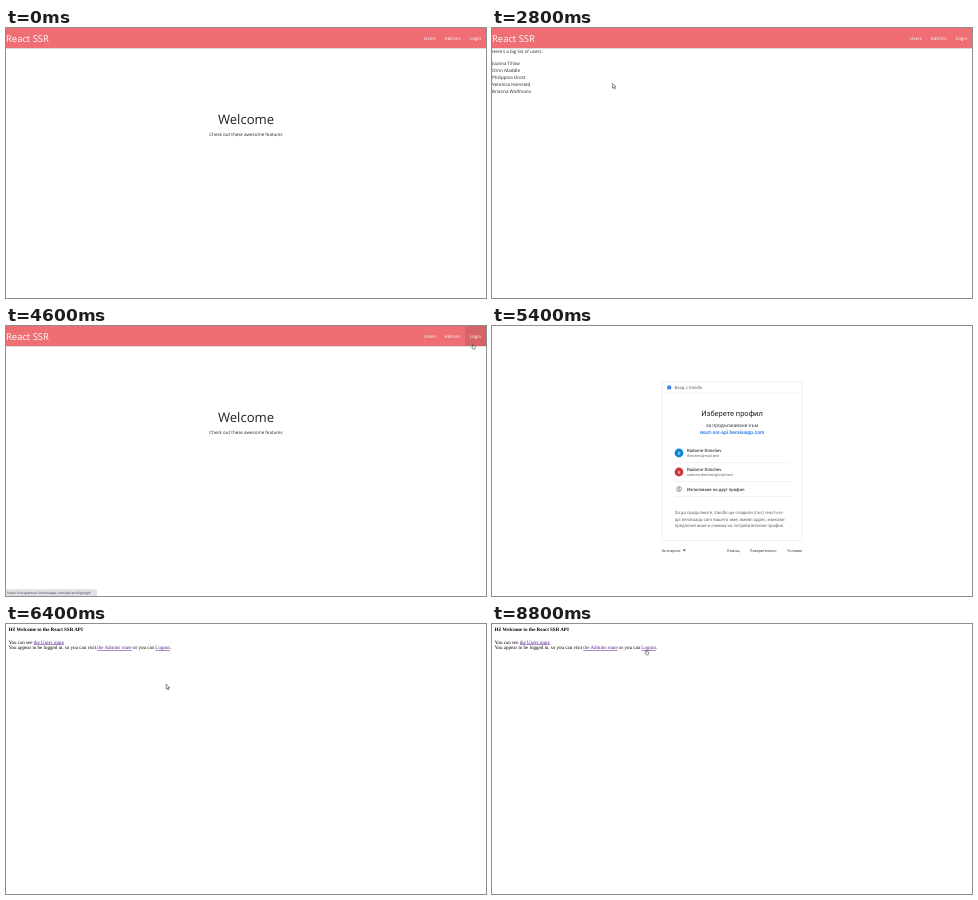
Write an HTML page that moves like this. It is 480 px wide and 270 px high and loops after 9590 ms.

```html
<!DOCTYPE html>
<html lang="en">
<head>
<meta charset="utf-8">
<title>React SSR walkthrough</title>
<style>
  html, body { margin: 0; width: 100%; height: 100%; overflow: hidden; background: #fff; }
  svg { display: block; width: 100vw; height: 100vh; }
  text { text-rendering: geometricPrecision; white-space: pre; }
  .app { font-family: "Open Sans", "Noto Sans", sans-serif; font-size: 4.5px; fill: #212121; }
  .nav { fill: #fff; }
  .brand { font-size: 9.45px; }
  .title { font-size: 13.1px; }
  .mid { text-anchor: middle; }
  .status { font-size: 3.45px; fill: #45484c; }
  .login { font-family: Roboto, Arial, sans-serif; font-size: 4.375px; fill: #3c4043; }
  .small { font-size: 3.75px; }
  .soft { fill: #5f6368; }
  .strong { font-weight: 500; }
  .rule { stroke: #dadce0; stroke-width: .4; fill: none; }
  .api { font-family: "Liberation Serif", "Times New Roman", serif; font-size: 5px; fill: #000; }
  .link { fill: #551a8b; text-decoration: underline; }
  .json { font-family: "Liberation Mono", Consolas, monospace; font-size: 3.724px; fill: #111; }
</style>
</head>
<body>
<svg viewBox="0 0 480 270">
  <defs>
    <linearGradient id="shade" x1="0" y1="0" x2="0" y2="1">
      <stop offset="0" stop-color="#000" stop-opacity=".22"/>
      <stop offset="1" stop-color="#000" stop-opacity="0"/>
    </linearGradient>
  </defs>
  <rect width="480" height="270" fill="#fff"/>

  <g id="app" class="app">
    <g id="home" class="mid">
      <text class="title" x="240" y="95.5">Welcome</text>
      <text x="240" y="108.2">Check out these awesome features</text>
    </g>
    <g id="users"><text x="0" y="25.1">Here's a big list of users:</text></g>
    <rect y="20" width="480" height="1.4" fill="url(#shade)"/>
    <rect width="480" height="20" fill="#ee6e73"/>
    <rect id="hover" height="20" fill="#000" opacity=".1"/>
    <g class="nav">
      <text class="brand" x="0" y="13.8">React SSR</text>
      <text x="418" y="11.7">Users</text>
      <text x="438.8" y="11.7">Admins</text>
      <text x="463.8" y="11.7">Login</text>
    </g>
    <g id="status">
      <path id="bubble" fill="#dee1e6" stroke="#c4c7cc" stroke-width=".3"/>
      <text id="url" class="status" x="1.3" y="268"></text>
    </g>
  </g>

  <g id="login" class="login">
    <rect class="rule" x="169.7" y="55.5" width="140.6" height="159" rx="2.2"/>
    <g id="card">
      <circle cx="177.2" cy="61.4" r="2.2" fill="#4285f4"/>
      <text class="soft" x="182.6" y="63">Вход с Vandlo</text>
      <path class="rule" d="M170 67.2H310"/>
      <g class="mid">
        <text x="240" y="90.2" font-size="7.5" fill="#202124">Изберете профил</text>
        <text x="240" y="101.2" font-size="5">за продължаване към</text>
        <text class="strong" x="240" y="108.2" font-size="5" fill="#1a73e8">react-ssr-api.herokuapp.com</text>
      </g>
      <g id="accounts"></g>
      <g fill="none" stroke="#5f6368" stroke-width=".55">
        <circle cx="187" cy="163" r="2.5"/>
        <circle cx="187" cy="162.3" r=".8"/>
        <path d="M185.3 164.7Q187 163.2 188.7 164.7"/>
      </g>
      <text class="strong" x="195" y="164.5">Използване на друг профил</text>
      <path class="rule" d="M182.5 136.7H298M182.5 155.5H298M182.5 170.5H298"/>
      <g class="soft">
        <text x="182.8" y="188.4">За да продължите, Vandlo ще сподели (със) react-ssr-</text>
        <text x="182.8" y="194.6">api.herokuapp.com вашето име, имейл адрес, езикови</text>
        <text x="182.8" y="200.9">предпочитания и снимка на потребителския профил.</text>
      </g>
    </g>
    <g id="progress">
      <path d="M169.7 57V56.6Q169.7 54.9 171.6 54.9H308.4Q310.3 54.9 310.3 56.6V57Z" fill="#d3dff0"/>
      <rect x="190" y="54.9" width="90.5" height="2.1" fill="#4384d6"/>
    </g>
    <g class="small">
      <text x="170" y="225.9">български</text>
      <path d="M190.8 223.6H193.8L192.3 225.4Z"/>
      <text x="234.8" y="225.9">Помощ</text>
      <text x="257.8" y="225.9">Поверителност</text>
      <text x="295.3" y="225.9">Условия</text>
    </g>
  </g>

  <g id="api" class="api">
    <text x="2.5" y="7" font-weight="bold">Hi! Welcome to the React SSR API</text>
    <text x="2.5" y="19.5">You can see <tspan class="link">the Users route</tspan></text>
    <text x="2.5" y="25.3">You appear to be logged in, so you can visit <tspan class="link">the Admins route</tspan> or you can <tspan class="link">Logout</tspan>.</text>
  </g>

  <text id="json" class="json" x="2.5" y="6.6"></text>

  <g id="cursor" stroke="#222" stroke-width=".5" fill="#fff" stroke-linejoin="round">
    <path id="arrow" d="M.2 .2V5L1.3 4L2.1 5.9L2.9 5.5L2.1 3.7H3.6Z"/>
    <path id="hand" d="M.9 3.4V.7Q1.3 0 1.7 .7V2.2L3.3 2.5Q3.8 2.7 3.7 3.4L3.2 5.5H1.2L0 3.6Q.2 2.9 .9 3.4Z"/>
  </g>
</svg>
<script>
const LOOP = 9590, STEP = 200;
const SITE = "https://ssrappreact.herokuapp.com";
const $ = id => document.getElementById(id);
const show = (id, on) => $(id).setAttribute("display", on ? "inline" : "none");

const users = ["Joanna Tillow", "Orrin Maddle", "Philippina Drost", "Veronica Hamsted", "Brianna Wolfmann"];
const admins = ["Dorian Feldstat", "Frederik Asmundsdottir", "Sabina Lindhert", "Tobiah Marlton", "Lou Hadvern"];
const accounts = [["dimchev@mail.test", 127, "#0f86d6"], ["radomir.dimchev@mail.test", 146, "#cb3636"]];

$("users").innerHTML += users.map((name, i) =>
  `<text x="0" y="${36.9 + 7.03 * i}">${name}</text>`).join("");
$("json").textContent = JSON.stringify(admins.map((name, i) => ({ id: i + 1, name })));
$("accounts").innerHTML = accounts.map(([mail, y, color]) =>
  `<circle cx="187" cy="${y}" r="4.4" fill="${color}"/>
   <text class="mid" x="187" y="${y + 1.6}" style="fill:#fff">R</text>
   <text class="strong" x="195" y="${y - .9}">Radomir Dimchev</text>
   <text class="small soft" x="195" y="${y + 4}">${mail}</text>`).join("");

// start, screen
const screens = [[0, "home"], [1800, "users"], [3800, "home"], [5400, "login"],
  [6400, "api"], [7200, "json"], [7800, "api"]];

// start, end, left edge, width, path, status width
const hovers = [
  [1400, 2000, 413.7, 20.5, "/users", 71.5],
  [3800, 4600, 434.2, 25, "/admins", 75],
  [4600, 5400, 459.2, 20.8, "/api/auth/google", 90.5]
];

// time, x, y of the pointer; each run is eased between its points
const runs = [
  [[200, 48, 32.5], [1200, 369, 22.5], [1400, 420.4, 17.2], [1800, 420.4, 17.2], [2600, 120.3, 55.2],
   [2800, 120.3, 55.2], [3600, 430, 23.5], [3800, 444, 17.5], [4400, 444, 17.5], [4600, 465.6, 17.6], [5399, 465.6, 17.6]],
  [[6400, 160, 60], [6670, 104, 23], [7199, 104, 23]],
  [[7200, 68.6, 18.6], [7800, 68.6, 18.6], [8400, 118, 34.5], [8800, 153, 25.3], [LOOP, 153, 25.3]]
];

function pointerAt(t) {
  const run = runs.find(r => t >= r[0][0] && t <= r[r.length - 1][0]);
  if (!run) return null;
  const i = Math.max(1, run.findIndex(p => p[0] >= t));
  const [t0, x0, y0] = run[i - 1], [t1, x1, y1] = run[i];
  const u = (t - t0) / (t1 - t0), e = u * u * (3 - 2 * u);
  return [x0 + (x1 - x0) * e, y0 + (y1 - y0) * e];
}

function draw(time) {
  const t = time >= 6670 && time < 7200 ? 6670 : Math.floor(time / STEP) * STEP;
  const screen = screens.filter(s => t >= s[0]).pop()[1];
  for (const id of ["home", "users", "login", "api", "json"]) show(id, id === screen);
  show("app", screen === "home" || screen === "users");

  const hover = hovers.find(h => t >= h[0] && t < h[1]);
  show("hover", hover);
  show("status", hover);
  if (hover) {
    const [, , x, width, path, end] = hover;
    $("hover").setAttribute("x", x);
    $("hover").setAttribute("width", width);
    $("bubble").setAttribute("d", `M-1 263.6H${end - 1}Q${end} 263.6 ${end} 264.6V271H-1Z`);
    $("url").textContent = SITE + path;
  }

  const busy = t >= 6000;
  show("progress", busy);
  $("card").setAttribute("opacity", busy ? .5 : 1);

  const at = pointerAt(t), onLink = hover || t === 6670 || t >= 8800;
  show("cursor", at);
  show("hand", onLink);
  show("arrow", !onLink);
  if (at) $("cursor").setAttribute("transform", `translate(${at[0]} ${at[1]})`);
}

const start = performance.now();
function tick() {
  draw((performance.now() - start) % LOOP);
  requestAnimationFrame(tick);
}
draw(0);
requestAnimationFrame(tick);
</script>
</body>
</html>
```
